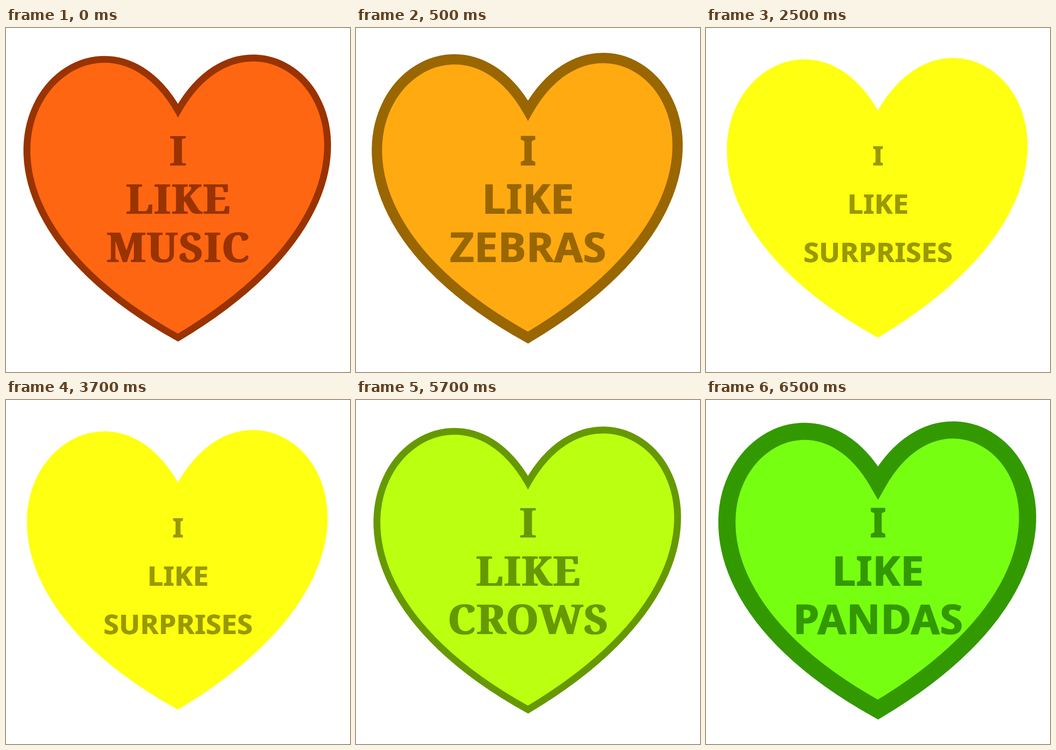
Write an HTML page with a canvas that moves like this. It is 748x748 px and loops after 8000 ms.

```html
<!DOCTYPE html>
<html lang="en">
<head>
<meta charset="utf-8">
<title>Candy hearts</title>
<style>
html, body { margin: 0; width: 100%; height: 100%; overflow: hidden; background: #fff; }
canvas { display: block; width: 748px; height: 748px; }
</style>
</head>
<body>
<canvas id="stage" width="748" height="748"></canvas>
<script>
const ctx = document.getElementById('stage').getContext('2d');
const UNIT = 7.48; // the card is laid out on a 100 x 100 grid
const LOOP = 8000;
const heart = new Path2D('M50 24C25 -20 -34.9 43 50 90C133.9 40 75 -20 50 24Z');

// weight and spacing, in em, thicken the bold face into a black one
const SANS = { family: '"Noto Sans", sans-serif', weight: 0.026, spacing: 0.013 };
const SERIF = { family: '"Noto Serif", serif', weight: 0.033, spacing: 0.026 };

const cards = [
  { start: 0, word: 'MUSIC', fill: '#f61', ink: '#930', line: 2, size: 12, face: SERIF },
  { start: 500, word: 'ZEBRAS', fill: '#fa1', ink: '#960', line: 3, size: 12, face: SANS },
  { start: 2500, word: 'SURPRISES', fill: '#ff1', ink: '#990', line: 0, size: 8, face: SANS },
  { start: 4500, word: 'CROWS', fill: '#bf1', ink: '#690', line: 2, size: 12, face: SERIF },
  { start: 6500, word: 'PANDAS', fill: '#7f1', ink: '#390', line: 5, size: 12, face: SANS }
];

function drawLine(text, y, px, { weight, spacing }) {
  const x = 50 * UNIT + spacing * px / 2; // balance the space after the last letter
  for (const side of [-0.5, 0, 0.5]) ctx.fillText(text, x + side * weight * px, y);
}

function drawCard({ word, fill, ink, line, size, face }) {
  ctx.setTransform(1, 0, 0, 1, 0, 0);
  ctx.fillStyle = '#fff';
  ctx.fillRect(0, 0, 748, 748);

  ctx.setTransform(UNIT, 0, 0, UNIT, 0, 0);
  ctx.fillStyle = fill;
  ctx.fill(heart);
  if (line) {
    ctx.strokeStyle = ink;
    ctx.lineWidth = line;
    ctx.stroke(heart);
  }

  ctx.setTransform(1, 0, 0, 1, 0, 0);
  const px = size * UNIT;
  ctx.fillStyle = ink;
  ctx.textAlign = 'center';
  ctx.font = `900 ${px}px ${face.family}`;
  ctx.letterSpacing = `${face.spacing * px}px`;
  ['I', 'LIKE', word].forEach((text, i) => drawLine(text, (40 + 14 * i) * UNIT, px, face));
}

const origin = performance.now();
function tick() {
  const t = (performance.now() - origin) % LOOP;
  drawCard(cards.findLast(card => card.start <= t));
  requestAnimationFrame(tick);
}
tick();
</script>
</body>
</html>
```
